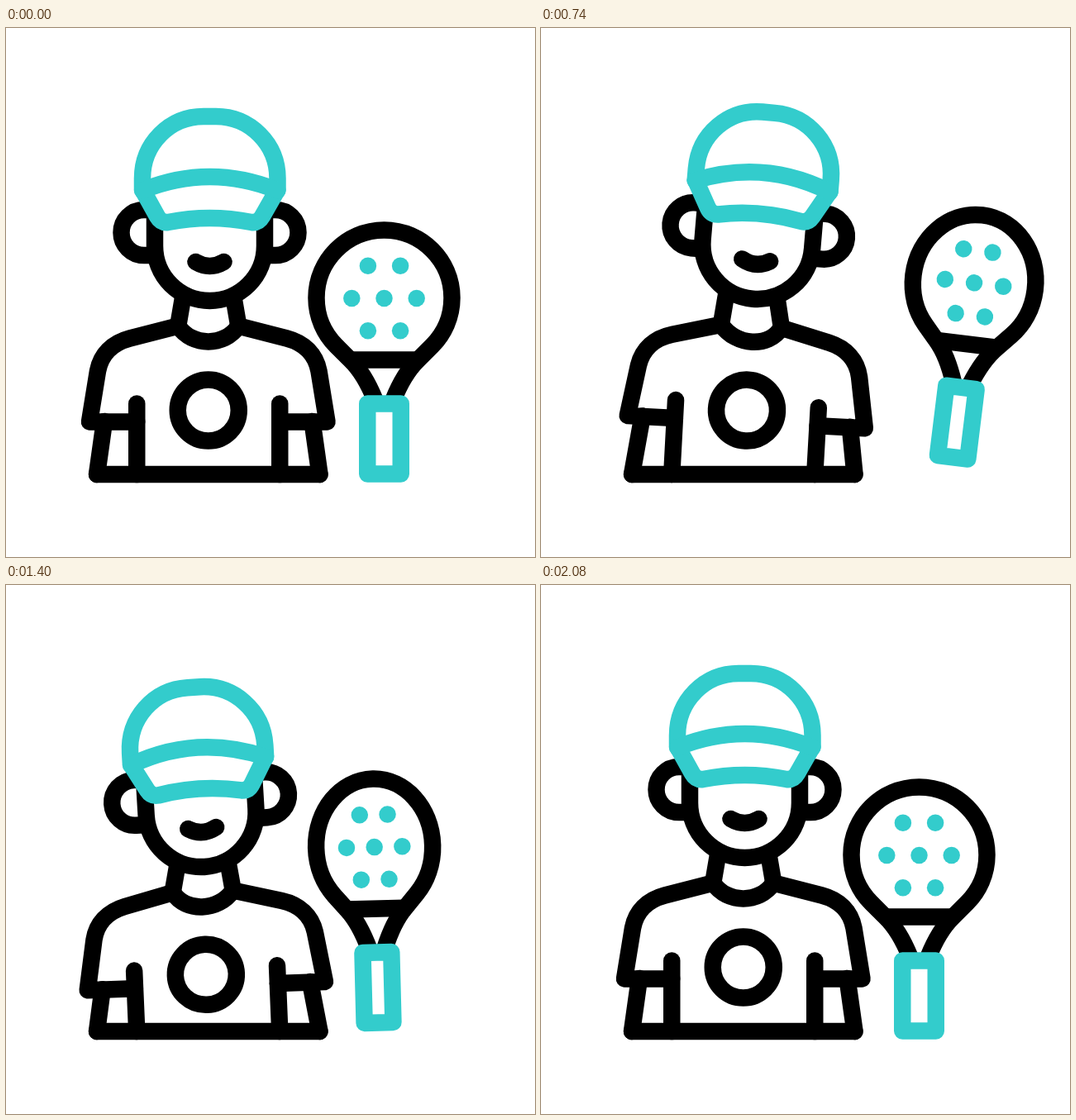
An HTML page with a canvas that plays this animation: 640x640 px, repeating every 2200 ms.

```html
<!DOCTYPE html>
<html lang="en">
<head>
<meta charset="utf-8">
<title>Padel player</title>
<style>
html, body { margin: 0; width: 100%; height: 100%; overflow: hidden; background: #fff; }
canvas { display: block; width: 640px; height: 640px; }
</style>
</head>
<body>
<canvas id="stage" width="640" height="640"></canvas>
<script>
const ctx = document.getElementById('stage').getContext('2d');
const LOOP = 2200, WEIGHT = 20.5, BLACK = '#000', TEAL = '#33cccc';
const BODY = 244.75, CHEST = 462.5, HEAD = 246.5, EARS = 247.5;
const RACKET = 457.5, NET = 326.5, BASE = 540;

// Swings with a cosine ease from one [time, value] point to the next
function swing(t, ...points) {
  let [from, value] = points[0];
  for (const [to, next] of points) {
    if (t < to) {
      const p = Math.max(0, (t - from) / (to - from));
      return value + (next - value) * (1 - Math.cos(Math.PI * p)) / 2;
    }
    from = to;
    value = next;
  }
  return value;
}

const ground = () => ctx.setTransform(1, 0, 0, 1, 0, 0);

function space(x, y, degrees, restX, restY, scaleX = 1, scaleY = 1) {
  return () => {
    ground();
    ctx.translate(x, y);
    ctx.rotate(degrees * Math.PI / 180);
    ctx.scale(scaleX, scaleY);
    ctx.translate(-restX, -restY);
  };
}

// Points follow the part, the pen keeps its width
function stroke(enter, trace, color = BLACK, fill) {
  ctx.beginPath();
  enter();
  trace();
  ground();
  if (fill) { ctx.fillStyle = fill; ctx.fill(); }
  ctx.strokeStyle = color;
  ctx.stroke();
}

function link(enterA, ax, ay, enterB, bx, by) {
  stroke(enterA, () => {
    ctx.moveTo(ax, ay);
    enterB();
    ctx.lineTo(bx, by);
  });
}

function drawTorso(torso, head, bend) {
  for (const side of [-1, 1]) {
    const X = d => BODY + side * d;
    link(torso, X(125.75), 476, ground, X(134.75), BASE);
    link(torso, X(86.5), 454.5, ground, X(86.5), BASE);
    link(head, X(30.5), 325, torso, X(36.5), 360);
    stroke(torso, () => {
      ctx.moveTo(X(36.5), 360.5);
      ctx.lineTo(X(95), 375.5);
      ctx.bezierCurveTo(X(116), 381, X(130), 395, X(133.75), 415);
      ctx.lineTo(X(143.75), 476.5);
      ctx.lineTo(X(86.5), 476.5);
    });
  }
  link(ground, BODY - 134.75, BASE, ground, BODY + 134.75, BASE);
  stroke(torso, () => {
    ctx.moveTo(BODY - 36, 361);
    ctx.bezierCurveTo(BODY - 20 + bend, 385.5, BODY + 20 + bend, 385.5, BODY + 36, 361);
  });
  stroke(torso, () => ctx.arc(BODY, CHEST, 37, 0, 7));
}

function drawHead(head, slide) {
  ctx.lineCap = 'butt';
  for (const side of [-1, 1]) {
    const X = d => HEAD + side * d;
    stroke(head, () => {
      ctx.moveTo(X(70), EARS - 27.5);
      ctx.arc(X(79.5), EARS, 27.5, -Math.PI / 2, Math.PI / 2, side < 0);
      ctx.lineTo(X(66), EARS + 27.5);
    });
  }
  stroke(head, () => {
    ctx.moveTo(HEAD - 66.5, 224);
    ctx.arc(HEAD, 263.5, 66.5, Math.PI, 0, true);
    ctx.lineTo(HEAD + 66.5, 224);
  });
  ctx.lineCap = 'round';
  stroke(head, () => {
    ctx.moveTo(HEAD - 17, 283);
    ctx.quadraticCurveTo(HEAD, 293, HEAD + 17, 283);
  });

  const cap = () => { head(); ctx.translate(0, slide); };
  stroke(cap, () => {
    ctx.moveTo(165, 195.5);
    ctx.lineTo(165, 182);
    ctx.bezierCurveTo(165, 140, 198, 107, 239, 107);
    ctx.lineTo(254, 107);
    ctx.bezierCurveTo(295, 107, 328.5, 140, 328.5, 182);
    ctx.lineTo(328.5, 195.5);
    ctx.lineTo(310, 228);
    ctx.quadraticCurveTo(305.5, 236, 297, 235);
    ctx.quadraticCurveTo(HEAD, 225, 196, 235);
    ctx.quadraticCurveTo(187.5, 236, 183, 228);
    ctx.closePath();
  }, TEAL, '#fff');
  stroke(cap, () => {
    ctx.moveTo(165, 196.5);
    ctx.quadraticCurveTo(HEAD, 163.5, 328.5, 196.5);
  }, TEAL);
}

function drawRacket(racket) {
  ctx.lineCap = 'butt';
  stroke(racket, () => {
    ctx.moveTo(RACKET - 11, 450);
    ctx.quadraticCurveTo(RACKET - 24, 418, RACKET - 40.5, 402);
    ctx.arc(RACKET, NET, 82, Math.PI * 0.75, Math.PI * 0.25);
    ctx.lineTo(RACKET + 40.5, 402);
    ctx.quadraticCurveTo(RACKET + 24, 418, RACKET + 11, 450);
  });
  link(racket, RACKET - 40, 401.5, racket, RACKET + 40, 401.5);
  ctx.lineCap = 'round';
  stroke(racket, () => ctx.rect(RACKET - 20.25, 454.5, 40.5, 85), TEAL, '#fff');
  for (const row of [-1, 0, 1]) {
    const count = 3 - Math.abs(row);
    for (let i = 0; i < count; i++) {
      stroke(racket, () => {
        const x = RACKET + (i - (count - 1) / 2) * 39.2, y = NET + 0.5 + row * 39.2;
        ctx.moveTo(x, y);
        ctx.lineTo(x + 0.01, y);
      }, TEAL);
    }
  }
}

function draw(now) {
  const t = now % LOOP;

  // Crouch, leap, crouch, smaller leap, rest; the head follows the torso
  const lean = swing(t, [160, 0], [435, -3.5], [960, 6.9], [1250, -4.2], [1650, 2.6], [2080, 0]);
  const lift = swing(t, [160, 0], [435, 13], [960, -7.5], [1250, 16], [1650, -7], [2080, 0]);
  const squash = swing(t, [160, 0], [435, 15], [880, -7], [1060, 15], [1640, -5], [2000, 0]);
  const nod = 1.5 * lean - 0.14 * squash;
  const slide = 0.35 * lift - 1.1 * lean;
  const torso = space(BODY + 1.4 * lean, CHEST + lift, lean, BODY, CHEST, 1, 1 - 0.0015 * lift);
  const head = space(HEAD + 5.5 * lean, EARS + lift + squash, nod, HEAD, EARS);

  const x = swing(t, [160, RACKET], [710, 525], [1180, 441], [1800, RACKET]);
  const y = swing(t, [160, NET], [700, 307], [1110, 341], [1540, 309], [2080, NET]);
  const tilt = swing(t, [300, 0], [710, 7.2], [1090, -4.8], [1740, 2.4], [2080, 0]);
  const turn = swing(t, [160, 1], [1100, 0.86], [1500, 0.86], [2080, 1]);

  ground();
  ctx.fillStyle = '#fff';
  ctx.fillRect(0, 0, 640, 640);
  ctx.lineWidth = WEIGHT;
  ctx.lineCap = ctx.lineJoin = 'round';
  drawTorso(torso, head, 0.9 * lean);
  drawHead(head, slide);
  drawRacket(space(x, y, tilt, RACKET, NET, turn));
}

function tick() {
  draw(performance.now());
  requestAnimationFrame(tick);
}
tick();
</script>
</body>
</html>
```
